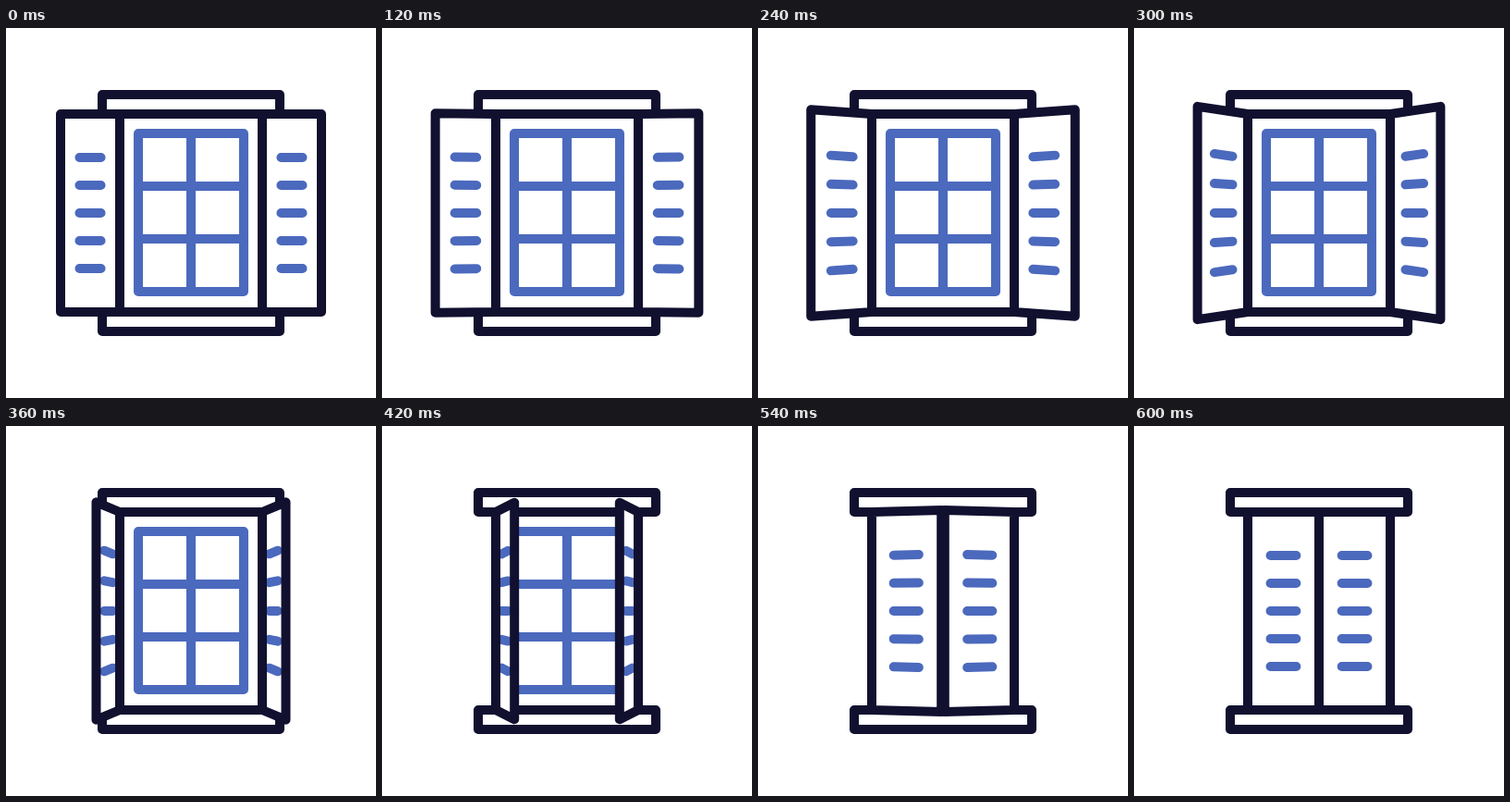
Animation of 400x400 px, one loop 630 ms. Source, as an HTML page:

```html
<!DOCTYPE html>
<html lang="en">
<head>
<meta charset="utf-8">
<title>Window shutters</title>
<style>
  html, body { margin: 0; width: 100%; height: 100%; overflow: hidden; background: #fff; }
  svg { display: block; width: 100%; height: 100%; }
  path { fill: none; stroke-width: 10; stroke-linecap: round; stroke-linejoin: round; }
  .dark { stroke: #11102f; }
  .blue { stroke: #4b69bd; }
  .panel { fill: #fff; stroke: none; }
</style>
</head>
<body>
<svg viewBox="0 0 400 400">
  <path class="dark" d="M104 72H296V93H104ZM104 307H296V328H104ZM123 93H277V307H123Z"/>
  <path class="blue" d="M143 114H257V285H143ZM200 114V285M143 171H257M143 228H257"/>
  <g id="left"></g>
  <g id="right" transform="matrix(-1 0 0 1 400 0)"></g>
</svg>
<script>
const LOOP = 630, STEP = 30, KEY_GAP = 60;
const HINGE = 77, HALF = 107, DEPTH = 0.093;
// Shutter angle in degrees, one value per KEY_GAP
const ANGLES = [0, 0.8, 4.5, 13, 27, 49.5, 77, 109.7, 142, 168, 180];
const ROWS = [-60, -30, 0, 30, 60];

const shutters = ['left', 'right'].map(id => {
  const group = document.getElementById(id);
  return ['panel', 'blue', 'dark'].map(name => {
    const path = document.createElementNS('http://www.w3.org/2000/svg', 'path');
    path.setAttribute('class', name);
    return group.appendChild(path);
  });
});

// Catmull-Rom through the angle keys
function angleAt(ms) {
  const last = ANGLES.length - 1;
  const pos = Math.min(ms / KEY_GAP, last);
  const i = Math.min(Math.floor(pos), last - 1);
  const u = pos - i;
  const key = n => ANGLES[Math.max(0, Math.min(last, n))];
  const a = key(i - 1), b = key(i), c = key(i + 1), d = key(i + 2);
  const deg = b + 0.5 * u * (c - a + u * (2 * a - 5 * b + 4 * c - d + u * (3 * (b - c) + d - a)));
  return deg * Math.PI / 180;
}

function draw(ms) {
  const angle = angleAt(ms);
  const width = 64 + 13 * Math.sin(angle / 2);
  const scale = r => 1 / (1 - DEPTH * Math.sin(angle) * r);
  const x = r => 200 - (HINGE + width * r * Math.cos(angle)) * scale(r);
  const y = (offset, r) => 200 + offset * scale(r);
  const point = (px, py) => px.toFixed(2) + ' ' + py.toFixed(2);

  const outline = 'M' + [
    point(x(0), y(-HALF, 0)), point(x(1), y(-HALF, 1)),
    point(x(1), y(HALF, 1)), point(x(0), y(HALF, 0))
  ].join('L') + 'Z';
  const slats = ROWS.map(row =>
    'M' + point(x(0.319), y(row, 0.3)) + 'L' + point(x(0.68), y(row, 0.9))
  ).join('');

  for (const parts of shutters) {
    [outline, slats, outline].forEach((d, i) => parts[i].setAttribute('d', d));
  }
}

const start = performance.now();
function tick() {
  const ms = (performance.now() - start) % LOOP;
  draw(Math.floor(ms / STEP) * STEP);
  requestAnimationFrame(tick);
}
tick();
</script>
</body>
</html>
```
